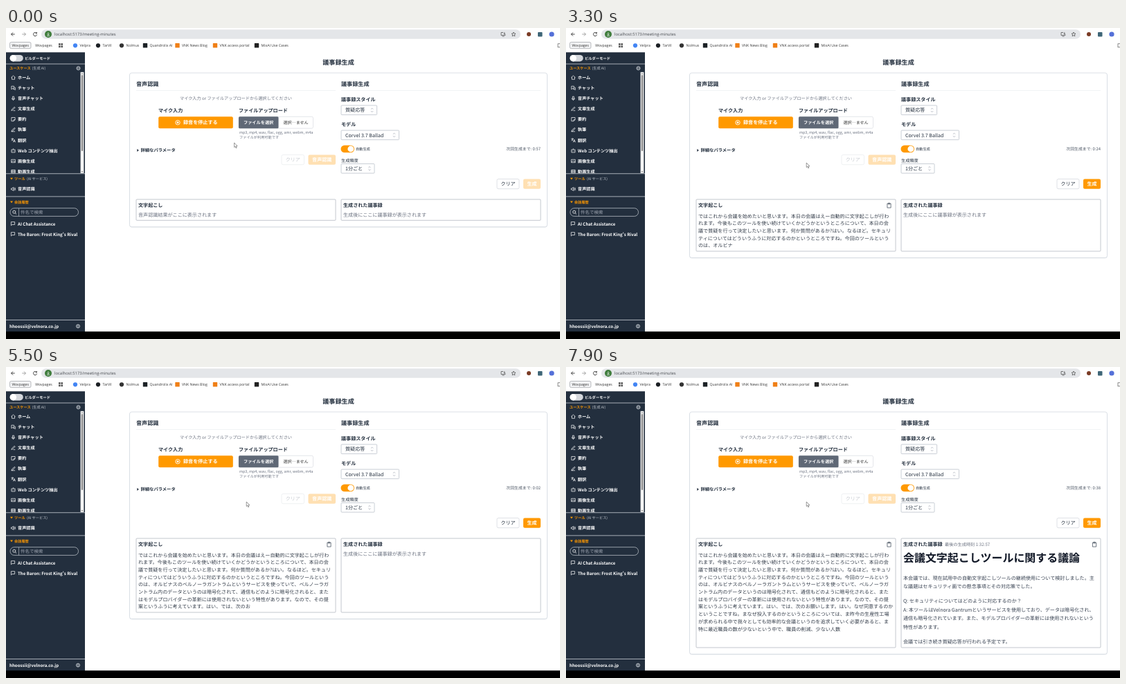
An HTML page for the animation above (8 s loop, 800x450 px).

```html
<!DOCTYPE html>
<html lang="ja">
<head>
<meta charset="utf-8">
<title>議事録生成</title>
<style>
html, body { margin: 0; width: 100%; height: 100%; overflow: hidden; background: #fff; }
svg { display: block; width: 100vw; height: 100vh; }
text { font-family: "Noto Sans CJK JP", "Noto Sans CJK", sans-serif; text-rendering: geometricPrecision; white-space: pre; }
.ui { font-family: "Open Sans", sans-serif; }
.b { font-weight: 700; }
.m { font-weight: 500; }
.r { text-anchor: end; }
.c { text-anchor: middle; }
</style>
</head>
<body>
<svg id="stage" viewBox="0 0 800 450"></svg>
<script>
const INK = '#232f3e', ORANGE = '#ff9900', PALE = '#ffe0b2', GRAY = '#6b7280', EDGE = '#a9afb9';

// y is the vertical middle of the glyphs
const text = (x, y, size, str, fill = INK, cls = '') =>
  `<text x="${x}" y="${y + size * .37}" font-size="${size}" fill="${fill}" class="${cls}">${str}</text>`;
const rect = (x, y, x2, y2, fill, r = 0, stroke = 'none', w = .7) =>
  `<rect x="${x}" y="${y}" width="${x2 - x}" height="${y2 - y}" rx="${r}" fill="${fill}" stroke="${stroke}" stroke-width="${w}"/>`;
const disc = (x, y, r, fill, stroke = 'none', w = .8) =>
  `<circle cx="${x}" cy="${y}" r="${r}" fill="${fill}" stroke="${stroke}" stroke-width="${w}"/>`;
const line = (x, y, d, stroke = '#fff', w = .7, fill = 'none') =>
  `<path transform="translate(${x} ${y})" d="${d}" fill="${fill}" stroke="${stroke}" stroke-width="${w}" stroke-linejoin="round"/>`;
const gear = (x, y) => disc(x, y, 2.5, 'none', '#dde1e6', .9) + disc(x, y, 1, 'none', '#dde1e6', .6);
const clip = x => line(x, 256.7, 'M-2.6-2.6H2.6V3.4H-2.6ZM-1.2-3.4H1.2V-1.8H-1.2Z', '#4b5563', .8);
const select = (x2, y, label) => rect(484, y, x2, y + 13.6, '#fff', 1, '#b4bac4') + text(490, y + 6.8, 7.08, label) +
  line(x2 - 7, y + 6.8, 'M-1.6-1.2L0-2.8 1.6-1.2M-1.6 1.2L0 2.8 1.6 1.2', '#9ca3af');
const button = (x, x2, y, label, fill, color, stroke, cls = 'm') =>
  rect(x, y, x2, y + 14.2, fill, 2, stroke) + text((x + x2) / 2, y + 7.1, 7.08, label, color, 'c ' + cls);

const menu = [
  ['ホーム', 'M-3 0L0-2.7 3 0M-2-.8V2.6H2V-.8'],
  ['チャット', 'M-2.6-2.6H1V.5H-1L-2.6 2ZM2-.8H2.8V2.8L1.5 1.8H-.5'],
  ['音声チャット', 'M-1-2.8H1V.6H-1ZM-2.2-.4Q-2 2 0 2 2 2 2.2-.4M0 2V3'],
  ['文章生成', 'M-2.6 2.6L-2 .8 1.6-2.8 2.6-1.8-1 1.9ZM0 2.6H2.8'],
  ['要約', 'M-2.6-2.6H2.6V.6L.6 2.6H-2.6ZM.6 2.6V.6H2.6'],
  ['執筆', 'M-2.6 2.6L-1.8.4 2-2.8 2.7-2-.8 2ZM-2.6 2.6H2.6'],
  ['翻訳', 'M-3-2H.6M-1.2-3V-2M-2.6 1L0-2M-2-.8L0 1M0 3L1.5-.8 3 3M.6 1.8H2.4'],
  ['Web コンテンツ抽出', 'M-2.6-1.4H2.6V2.6H-2.6ZM0-1.4V-3M-1.2.2V1M1.2.2V1'],
  ['画像生成', 'M-2.8-2.2H2.8V2.2H-2.8ZM-2.6 1.6L-.6-.4.6.8 1.4 0 2.6 1.6'],
  ['動画生成', 'M-2.8-2.2H2.8V2.2H-2.8ZM-1.4-2.2V2.2M1.4-2.2V2.2M-2.8 0H2.8']
];
const bookmarks = [
  [100, 'Velpra', '#4285f4', 1], [133, 'TarVil', '#1b1f24', 1], [167, 'Nolmus', '#333', 1],
  [201, 'Quandrolix AI', '#1d2326'], [247.5, 'VNK News Blog', '#f08018'],
  [302, 'VNK access portal', '#f08018'], [362, 'MixAI Use Cases', '#222']
];

const browser = () => rect(0, 0, 800, 35, '#fff') + rect(51, 2.3, 743, 15.7, '#e4e6e9', 6.7) +
  line(10, 9, 'M2.7 0H-2.5M0-2.5L-2.5 0 0 2.5', '#333', .9) +
  line(26, 9, 'M-2.7 0H2.5M0-2.5L2.5 0 0 2.5', '#999', .9) +
  line(42, 9, 'M2.2-1.4A2.6 2.6 0 1 0 2.6.6M2.4-3V-1.2H.6', '#333', .9) +
  disc(61, 9, 5, '#3f7d3c') + line(61, 9, 'M0-2.6V1M-1.5-.4L0 1.2 1.5-.4M-2 2.4H2', '#fff') +
  text(70, 9, 5.9, 'localhost:5173/meeting-minutes', '#4a4d52', 'ui') +
  line(718, 9, 'M0-2.5H-3V1.6H3V.4M-1.5 3H1.5M1.8-3V0M.6-1L1.8.2 3-1', '#444') +
  line(733, 9, 'M0-3L.9-1 3-.8 1.4.6 1.9 2.8 0 1.7-1.9 2.8-1.4.6-3-.8-.9-1Z', '#444') +
  disc(755, 9, 3, '#7a3b25') + rect(768, 6, 774.5, 12.5, '#3f6678', 1) + disc(788, 9, 3.6, '#5470d8') +
  rect(5.5, 20.5, 36, 29.7, '#f2f3f5', 2, '#8d9196', .6) +
  text(20.7, 25.2, 5.2, 'Wovpages', '#333', 'ui c') + text(54.5, 25.2, 5.2, 'Wovpages', '#333', 'ui c') +
  [0, 1, 2, 3].map(i => rect(76 + i % 2 * 3.4, 22.2 + (i >> 1) * 3.4, 78.6 + i % 2 * 3.4, 24.8 + (i >> 1) * 3.4, '#555')).join('') +
  bookmarks.map(([x, name, color, round]) =>
    (round ? disc(x, 25.3, 3.1, color) : rect(x - 3.2, 22.1, x + 3.2, 28.5, color, .6)) +
    text(x + 6.5, 25.2, 5.2, name, '#333', 'ui')).join('') +
  rect(797, 22.8, 803, 27.8, 'none', 0, '#555');

const rule = y => rect(0, y, 114, y + .8, '#c9ced5');
const section = (y, name, note = '') => line(8, y, 'M-2-1.2H2L0 1.6Z', 'none', 0, ORANGE) +
  text(12, y, 5.2, name, ORANGE, 'b') + text(30, y, 5.2, note, '#c3c8cf');
const history = (y, name) => line(10, y - .5, 'M-2.6-2.4H2.6V1.4H-1L-2.6 2.8Z') + text(17, y, 6.15, name, '#fff', 'b');

const sidebar = () => rect(0, 35.2, 114, 440, INK) +
  rect(5.5, 38.9, 24.8, 48.5, '#d5d8dd', 4.8) + disc(10.4, 43.7, 4.7, '#fff') +
  text(27, 43.6, 5.3, 'ビルダーモード', '#fff', 'b') + rule(51.6) +
  text(5, 58.2, 5.2, 'ユースケース', ORANGE, 'b') + text(37.5, 58.2, 5.2, '(生成 AI)', '#c3c8cf') + gear(104.5, 58.2) +
  '<clipPath id="list"><path d="M0 60H114V210H0Z"/></clipPath><g clip-path="url(#list)">' +
  menu.map(([name, d], i) => line(10.5, 71.7 + i * 15.1, d) + text(17, 71.7 + i * 15.1, 6.15, name, '#fff', 'b')).join('') + '</g>' +
  rect(107.6, 63.8, 112.4, 210, '#f6f6f6') + rect(108.9, 68, 111.1, 178, '#8b8b8b', 1) +
  line(110, 66, 'M-1.2.8L0-1 1.2.8Z', 'none', 0, '#777') + line(110, 208, 'M-1.2-.8L0 1 1.2-.8Z', 'none', 0, '#777') +
  rule(210.4) + section(217.9, 'ツール', '(AI サービス)') +
  line(10.5, 233, 'M-3-1H-1.6L.2-2.6V2.6L-1.6 1H-3ZM1.3-1.4Q2.2 0 1.3 1.4M2.2-2.3Q3.8 0 2.2 2.3') +
  text(17, 233, 6.15, '音声認識', '#fff', 'b') + rule(243.5) + section(251.6, '会話履歴') +
  rect(6, 260.7, 104.5, 272.4, INK, 5.8, '#c9ced5') + rect(18, 261, 18.6, 272.3, '#c9ced5') +
  disc(11.8, 266.2, 2, 'none', '#fff') + line(13.2, 267.6, 'M0 0L1.8 1.8', '#fff', .8) +
  text(21, 266.6, 6.5, '件名で検索', '#9ca3af') +
  history(283.5, 'AI Chat Assistance') + history(298.6, "The Baron: Frost King's Rival") +
  rule(422) + text(5, 431.6, 6.15, 'hhoossii@velnora.co.jp', '#fff', 'b') + gear(104, 431.5);

const controls = () => text(480, 49.8, 9.1, '議事録生成', INK, 'b c') +
  text(188, 81, 8.1, '音声認識', INK, 'b') + text(484, 81, 8.1, '議事録生成', INK, 'b') +
  rect(188, 90.3, 476, 90.8, '#e3e6ea') + rect(484, 90.3, 772, 90.8, '#e3e6ea') +
  text(332, 102.2, 6.15, 'マイク入力 or ファイルアップロードから選択してください', GRAY, 'c') +
  text(220, 119.2, 7.08, 'マイク入力', INK, 'b') + text(336, 119.2, 7.08, 'ファイルアップロード', INK, 'b') +
  rect(220.2, 128.3, 327.8, 145.2, ORANGE, 2) + disc(248, 136.8, 3.2, 'none', '#fff', .9) + rect(246.7, 135.5, 249.3, 138.1, '#fff', .4) +
  text(256, 136.8, 7.08, '録音を停止する', '#fff', 'b') +
  rect(336, 128.3, 443.5, 145.2, '#fff', 2, '#d9dce1') + rect(336, 128.3, 393.5, 145.2, '#5f6876', 1.5) +
  text(343, 136.9, 6.2, 'ファイルを選択', '#fff', 'b') + text(400.5, 136.9, 6.05, '選択…ません', '#333') +
  text(337, 151.1, 5.4, 'mp3, mp4, wav, flac, ogg, amr, webm, m4a', GRAY) +
  text(337, 158.2, 5.2, 'ファイルが利用可能です', GRAY) +
  line(190.5, 177, 'M-1.2-2.1L1.4 0-1.2 2.1Z', 'none', 0, INK) + text(194.5, 177, 6.3, '詳細なパラメータ', INK, 'b') +
  button(398, 430.5, 183.5, 'クリア', '#fff', '#c8ccd2', '#e9ebee') + button(436.5, 476, 183.5, '音声認識', PALE, '#fff', 'none', 'b') +
  text(484, 103.5, 7.08, '議事録スタイル', INK, 'b') + select(535.6, 112, '質疑応答') +
  text(484, 139.4, 7.08, 'モデル', INK, 'b') + select(567.5, 148.1, 'Corvel 3.7 Ballad') +
  rect(483.5, 169.8, 503, 180.2, ORANGE, 5.2) + disc(497.8, 175, 4.4, '#fff') + text(505, 175.1, 5.2, '自動生成', INK) +
  text(484, 191.6, 6.2, '生成頻度', INK) + select(532, 196.5, '1分ごと') +
  button(709, 741, 218.5, 'クリア', '#fff', INK, '#d1d5db');

const speech = `ではこれから会議を始めたいと思います。本日の会議はえー自動的に文字起こしが行わ
れます。今後もこのツールを使い続けていくかどうかというところについて、本日の会
議で質疑を行って決定したいと思います。何か質問があるか?はい。なるほど。セキュリ
ティについてはどういうふうに対応するのかというところですね。今回のツールという
のは、オルビナスのベルノーラガントラムというサービスを使っていて、ベルノーラガ
ントラム内のデータというのは暗号化されて、通信もどのように暗号化されると、また
はモデルプロバイダーの革新には使用されないという特性があります。なので、その提
案というふうに考えています。はい、では、次のお願いします。はい。なぜ同意するのか
ということですね。まなぜ投入するのかというところについては、ま昨今の生産性工場
が求められる中で我々としても効率的な会議というのを追求していく必要があると、ま
特に最近職員の数が少ないという中で、職員の削減、少ない人数`.split('\n');
const minutes = `会議文字起こしツールに関する議論
本会議では、現在試用中の自動文字起こしツールの継続使用について検討しました。主
な議題はセキュリティ面での懸念事項とその対応策でした。
Q: セキュリティについてはどのように対応するのか？
A: 本ツールはVelnora Gantrumというサービスを使用しており、データは暗号化され、
通信も暗号化されています。また、モデルプロバイダーの革新には使用されないという
特性があります。
会議では引き続き質疑応答が行われる予定です。`.split('\n');
const minutesY = [276.4, 305, 317.5, 338.5, 351, 363.5, 376, 397.5];

// First n characters, kept in their lines
function reveal(lines, n) {
  const out = [];
  for (const l of lines) {
    if (n <= 0) break;
    out.push(l.slice(0, n));
    n -= l.length;
  }
  return out;
}
// Piecewise linear value through [time, value] points
function along(points, t) {
  const i = points.findIndex(p => p[0] > t);
  if (i < 0) return points.at(-1)[1];
  if (i === 0) return points[0][1];
  const [a, u] = points[i - 1], [b, v] = points[i];
  return u + (v - u) * (t - a) / (b - a);
}
const spoken = [[200, 0], [1400, 59], [3300, 164], [4700, 256], [6000, 323], [6500, 354], [7900, 421]];
const written = [[5700, 0], [6000, 66], [6400, 240]];

function results(t) {
  const said = reveal(speech, Math.round(along(spoken, t)));
  const notes = reveal(minutes, Math.round(along(written, t)));
  const busy = t >= 5700 && t < 6400, done = t >= 6400;
  const lastY = notes.length ? minutesY[notes.length - 1] : 269;
  const bottom = Math.max(said.length ? 269.6 + 10.68 * said.length : 278.3, lastY + (busy ? 18 : 8.5));
  const left = (((57 - t / 100) % 60) + 60) % 60;

  let s = rect(188, 248, 476, bottom, '#fff', 1, EDGE) + rect(484, 248, 772, bottom, '#fff', 1, EDGE) +
    text(191, 256.8, 7.08, '文字起こし', INK, 'b') + text(487, 256.4, 7.08, '生成された議事録', INK, 'b') +
    text(772, 175.2, 5.9, '次回生成まで: 0:' + String(left).padStart(2, '0'), '#4b5563', 'r') +
    button(747, 772, 218.5, '生成', said.length && !busy ? ORANGE : PALE, '#fff', 'none', 'b');

  s += said.length
    ? clip(466.5) + said.map((l, i) => text(191, 271.9 + i * 10.7, 7.08, l, '#333c49')).join('')
    : text(191, 270.5, 7.08, '音声認識結果がここに表示されます', GRAY);
  s += notes.length
    ? clip(763) + notes.map((l, i) => text(487, minutesY[i], i ? 7.08 : 15.95, l, i ? '#374151' : '#111827', i ? '' : 'b')).join('')
    : busy ? '' : text(487, 270.3, 7.08, '生成後にここに議事録が表示されます', GRAY);

  if (busy) {
    const y = lastY + 10.3;
    s += disc(491, y, 3.4, 'none', '#d5d9e2', 1.6) +
      `<g transform="rotate(${t * .36} 491 ${y})">${line(491, y, 'M-3.4 0A3.4 3.4 0 0 1 3.4 0', '#4469d8', 1.6)}</g>` +
      text(499, y, 6.2, '議事録生成中...', GRAY);
  }
  if (done) s += text(547, 256.6, 6.2, '最後の生成時刻 1:32:57', GRAY);
  if (done && t < 6900) {
    s += `<g filter="url(#soft)">${rect(681, 402, 830, 425, '#fff', 3)}</g>` + disc(690.8, 413.2, 3.5, '#111') +
      line(690.8, 413.2, 'M-1.5 0L-.4 1.2 1.6-1.1', '#fff', .8) +
      text(698, 413.3, 5.2, '議事録が正常に生成されました', '#111', 'm');
  }
  const move = along([[100, 0], [500, 1]], t);
  const ease = move * move * (3 - 2 * move);
  s += line(329.6 + 17.6 * ease, 166 + 29 * ease, 'M0 0V6.6L1.5 5.3 2.5 7.8 3.6 7.3 2.6 4.9H4.6Z', '#555', .6, '#fff');
  return { s, bottom };
}

const stage = document.getElementById('stage');
const panel = (y, fill, stroke) => rect(178.5, y, 781.5, y + 223, fill, 3, stroke).replace('<rect', '<rect class="panel"');
stage.innerHTML = `<defs><filter id="soft" x="-20%" y="-50%" width="140%" height="200%">
  <feDropShadow dx="0" dy="1.5" stdDeviation="2.5" flood-opacity=".18"/></filter></defs>` +
  rect(0, 0, 800, 450, '#fff') + browser() + sidebar() +
  panel(65.8, '#e3e6ea', 'none') + panel(65, '#fff', '#ccd3dc') +
  controls() + '<g id="live"></g>' + rect(0, 439.2, 800, 450, '#000');
const live = document.getElementById('live'), panels = stage.querySelectorAll('.panel');

let shown = -1;
function tick(now) {
  const t = Math.floor(now % 8000 / 100) * 100;
  if (t !== shown) {
    const { s, bottom } = results(t);
    live.innerHTML = s;
    panels.forEach(p => p.setAttribute('height', bottom + 9.5 - 65));
    shown = t;
  }
  requestAnimationFrame(tick);
}
requestAnimationFrame(tick);
</script>
</body>
</html>
```
